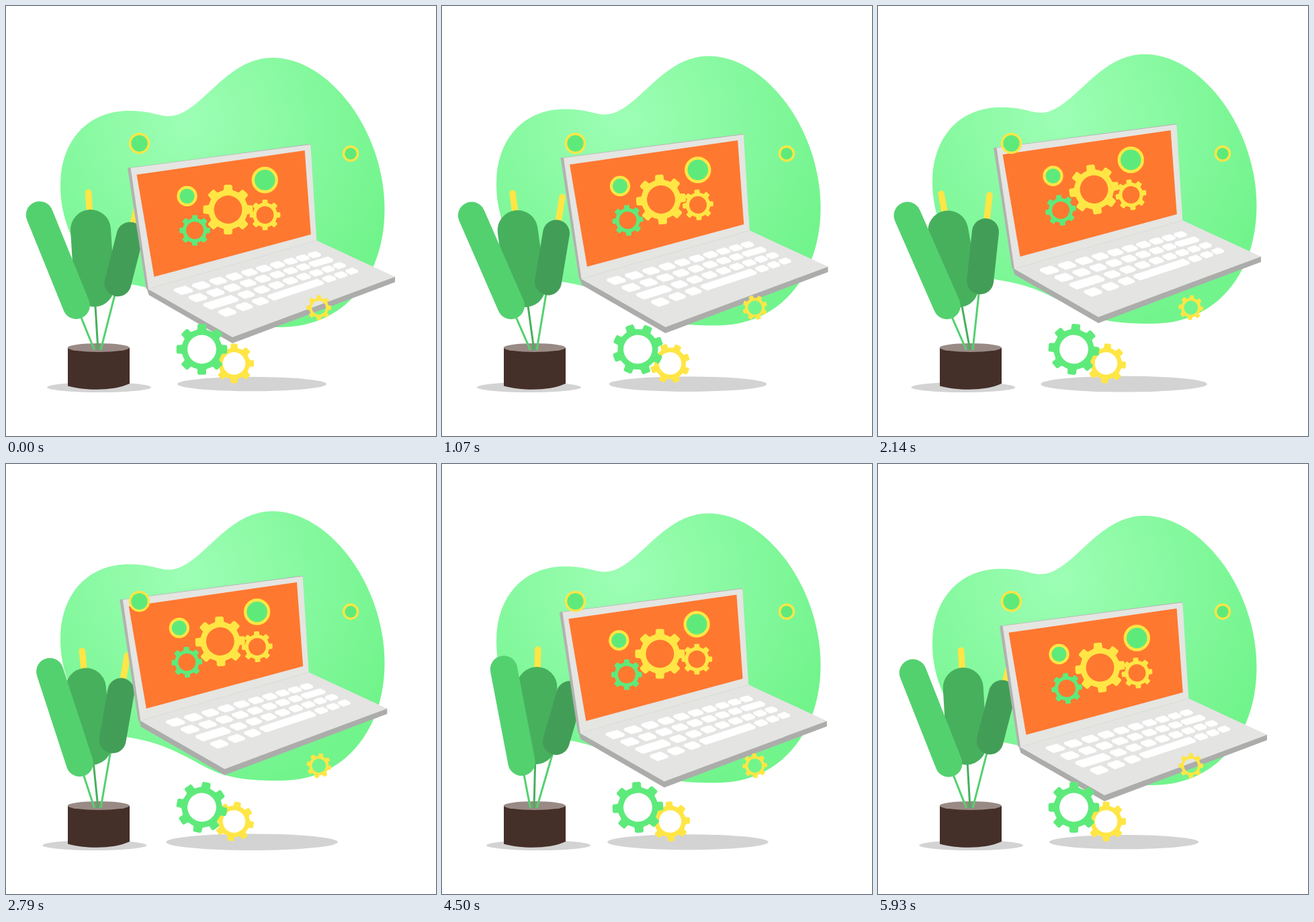
An HTML page that plays this animation: 640 by 640 pixels, repeating every 6000 ms.

```html
<!DOCTYPE html>
<html lang="en">
<head>
<meta charset="utf-8">
<title>Laptop and gears</title>
<style>
  html, body { margin: 0; width: 100%; height: 100%; overflow: hidden; background: #fff; }
  svg { display: block; width: 100vw; height: 100vh; }
  .round { stroke-linecap: round; }
  .ring { fill: #5eea7b; stroke: #ffe645; }
  .key { fill: #fff; stroke: #fff; stroke-width: 5; stroke-linejoin: round; }
</style>
</head>
<body>
<svg viewBox="0 0 640 640">
  <defs>
    <radialGradient id="mint" gradientUnits="userSpaceOnUse" cx="270" cy="170" r="330">
      <stop offset="0" stop-color="#9dfeb5"/>
      <stop offset="1" stop-color="#72f48c"/>
    </radialGradient>
  </defs>
  <path id="blob" fill="url(#mint)" d="M81 268C81 200 122 156 183 156C215 156 228 164 242 164C290 164 325 77 397 77C480 77 563.5 185 563.5 303C563.5 403 503 478.5 408 478C370 478 338 476 310 464C275 448 245 424 185 414C118 404 81 332 81 268Z"/>
  <ellipse id="plantShade" cy="567.5" rx="77.5" ry="7.5" fill="#d3d3d3"/>
  <ellipse id="deskShade" cx="366" cy="562.7" fill="#d3d3d3"/>
  <path fill="#452f29" d="M92 509V565.5C120 573 160 573 184 562V509Z"/>
  <ellipse cx="137.7" cy="508.5" rx="46" ry="6.5" fill="#9a8a85"/>
  <g id="plant"></g>
  <g id="laptop">
    <path fill="#b2b2b0" d="M181 241L453 205.2L454 208L212 421L208.5 421Z"/>
    <path fill="#e5e5e2" d="M185.5 241L453.3 206.2L462.3 349L212 421Z"/>
    <path fill="#ff7830" d="M194.5 251L444.6 215L453.8 340L220.5 403Z"/>
    <path fill="#acacab" d="M209.5 420L337 492L579 402.8V411L337 502L212.5 430Z"/>
    <path fill="#e4e4e2" d="M211.5 421L462.3 349L579 403L337 493Z"/>
    <path stroke="#dcdcda" d="M214 420.5L462 349.3"/>
    <g id="keys"></g>
    <g id="screen"></g>
  </g>
  <g id="floor"></g>
</svg>
<script>
const FPS = 14, LOOP = 6000, RETURN = 5930;
const YELLOW = '#ffe645', GREEN = '#5eea7b';
const $ = id => document.getElementById(id);
const mix = (a, b, k) => a + (b - a) * k;

function set(el, attrs) {
  for (const k in attrs) el.setAttribute(k, attrs[k]);
}
function add(parent, tag, attrs) {
  const el = document.createElementNS('http://www.w3.org/2000/svg', tag);
  set(el, attrs);
  parent.appendChild(el);
  return el;
}

// Linear keyframes: [time, value] pairs
function track(t, ...keys) {
  const i = Math.max(1, keys.findIndex(([time]) => t <= time));
  const last = keys.at(-1);
  if (t > last[0]) return last[1];
  const [t0, a] = keys[i - 1], [t1, b] = keys[i];
  return mix(a, b, (t - t0) / (t1 - t0));
}

// Eight-tooth gear around the origin
function gearPath(r, hole) {
  const root = .79;
  const pt = (deg, k) => {
    const a = deg * Math.PI / 180;
    return `${Math.sin(a) * k * r} ${-Math.cos(a) * k * r} `;
  };
  let d = '';
  for (let c = 0; c < 360; c += 45) {
    d += (c ? 'L' : 'M') + pt(c - 16, root) +
      'Q' + pt(c - 12.5, root) + pt(c - 11.8, .84) +
      'L' + pt(c - 10.6, .93) +
      'Q' + pt(c - 10, 1) + pt(c - 6.5, 1) +
      'L' + pt(c + 6.5, 1) +
      'Q' + pt(c + 10, 1) + pt(c + 10.6, .93) +
      'L' + pt(c + 11.8, .84) +
      'Q' + pt(c + 12.5, root) + pt(c + 16, root) +
      `A${root * r} ${root * r} 0 0 1 ` + pt(c + 29, root);
  }
  return d + `ZM${hole} 0A${hole} ${hole} 0 1 0 ${-hole} 0A${hole} ${hole} 0 1 0 ${hole} 0Z`;
}

const gears = [];
function gear(parent, x, y, r, fill, speed) {
  const el = add(parent, 'path', { d: gearPath(r, r * .563), fill, 'fill-rule': 'evenodd' });
  gears.push({ el, x, y, speed });
}
function ring(parent, cx, cy, r, width) {
  add(parent, 'circle', { cx, cy, r: r - width / 2, 'stroke-width': width, class: 'ring' });
}

// Speeds in degrees per ms
const SCREEN_SPIN = -.13, FLOOR_SPIN = -360 / RETURN;
const screen = $('screen'), floor = $('floor');
gear(screen, 281, 334, 23, GREEN, SCREEN_SPIN);
gear(screen, 385.5, 311, 23, YELLOW, SCREEN_SPIN);
gear(screen, 330.5, 303, 37.2, YELLOW, SCREEN_SPIN);
ring(screen, 269.5, 283, 15.2, 4.2);
ring(screen, 385.3, 259, 19.7, 4.4);
gear(floor, 339.5, 532, 29.7, YELLOW, FLOOR_SPIN);
gear(floor, 291.5, 511, 38, GREEN, FLOOR_SPIN);
gear(floor, 465.7, 449, 18.5, YELLOW, FLOOR_SPIN);
ring(floor, 198.5, 204.5, 15.7, 3.5);
ring(floor, 513, 219.7, 12.2, 3.4);

// Each digit is a key's width in units; units shrink with distance
const SHRINK = .948;
['1111111111', '111111112', '211111111', '1114111'].forEach((keys, row) => {
  const left = 250.3 + 22 * row, slope = .272 + .019 * row;
  const edge = u => left + (27.3 - .45 * row) * (1 - SHRINK ** u) / (1 - SHRINK);
  let u = 0;
  for (const units of keys) {
    const end = u + +units;
    const x = (edge(u) + edge(end)) / 2;
    const size = SHRINK ** ((u + end) / 2);
    const a = (edge(end) - edge(u)) / 2 - 6.7 * size, b = 5.4 * size;
    const y = 427 + 11 * row - slope * (x - left);
    const corner = (i, j) => `${x + i * a + j * b * .88} ${y - i * a * slope + j * b * .45} `;
    add($('keys'), 'path', {
      class: 'key',
      d: 'M' + corner(-1, -1) + corner(1, -1) + corner(1, 1) + corner(-1, 1) + 'Z'
    });
    u = end;
  }
});

// A leaf lies on a straight line from its foot in the pot to a swaying tip
const FOOT_Y = 512;
const leaves = {
  middle: { foot: 137, sway: [126, 101, 146.5], tipY: 333, rise: .07, base: .527, width: 60, color: '#47b05d' },
  right: { foot: 141, sway: [184.5, 157.5, 192.3], tipY: 341.5, rise: -.22, base: .585, width: 40, color: '#429e57' },
  left: { foot: 131.5, sway: [50, 39, 106], tipY: 311, rise: .13, base: .33, width: 40.5, color: '#53d16f' }
};
const lines = [];
function line(leaf, from, to, stroke, width, cls = 'round') {
  const el = add($('plant'), 'line', { stroke, 'stroke-width': width, class: cls });
  lines.push({ el, leaf, from, to });
}
const { middle, right, left } = leaves;
for (const leaf of [middle, right]) line(leaf, 1.1, 1.31, YELLOW, 9.5);
for (const leaf of [left, middle, right]) {
  line(leaf, 0, leaf.base, leaf === middle ? middle.color : left.color, 3, 'stem');
}
for (const leaf of [middle, right, left]) line(leaf, leaf.base, 1, leaf.color, leaf.width);

function draw(t) {
  const lift = track(t, [0, 0], [LOOP / 2, 1], [RETURN, 0]);
  set($('laptop'), { transform: `translate(${-12.6 * lift} ${-42 * lift})` });
  set($('blob'), { transform: `translate(0 ${-7.2 * lift})` });
  const rx = 111 + 18 * lift;
  set($('deskShade'), { rx, ry: rx * .096 });
  set($('plantShade'), { cx: track(t, [0, 138.5], [1750, 123.8], [4350, 144.1], [LOOP, 138.5]) });

  for (const { el, leaf, from, to } of lines) {
    const [rest, back, front] = leaf.sway;
    const tipX = track(t, [0, rest], [2000, back], [4000, front], [LOOP, rest]);
    const tipY = leaf.tipY - leaf.rise * (tipX - rest);
    set(el, {
      x1: mix(leaf.foot, tipX, from), y1: mix(FOOT_Y, tipY, from),
      x2: mix(leaf.foot, tipX, to), y2: mix(FOOT_Y, tipY, to)
    });
  }
  for (const { el, x, y, speed } of gears) {
    set(el, { transform: `translate(${x} ${y}) rotate(${speed * t})` });
  }
}

// The picture advances in whole steps, 14 per second
const start = performance.now();
function tick() {
  const t = (performance.now() - start) % LOOP;
  const step = Math.floor((t + 5) * FPS / 1000) % (LOOP * FPS / 1000);
  draw(step * 1000 / FPS);
  requestAnimationFrame(tick);
}
tick();
</script>
</body>
</html>
```
